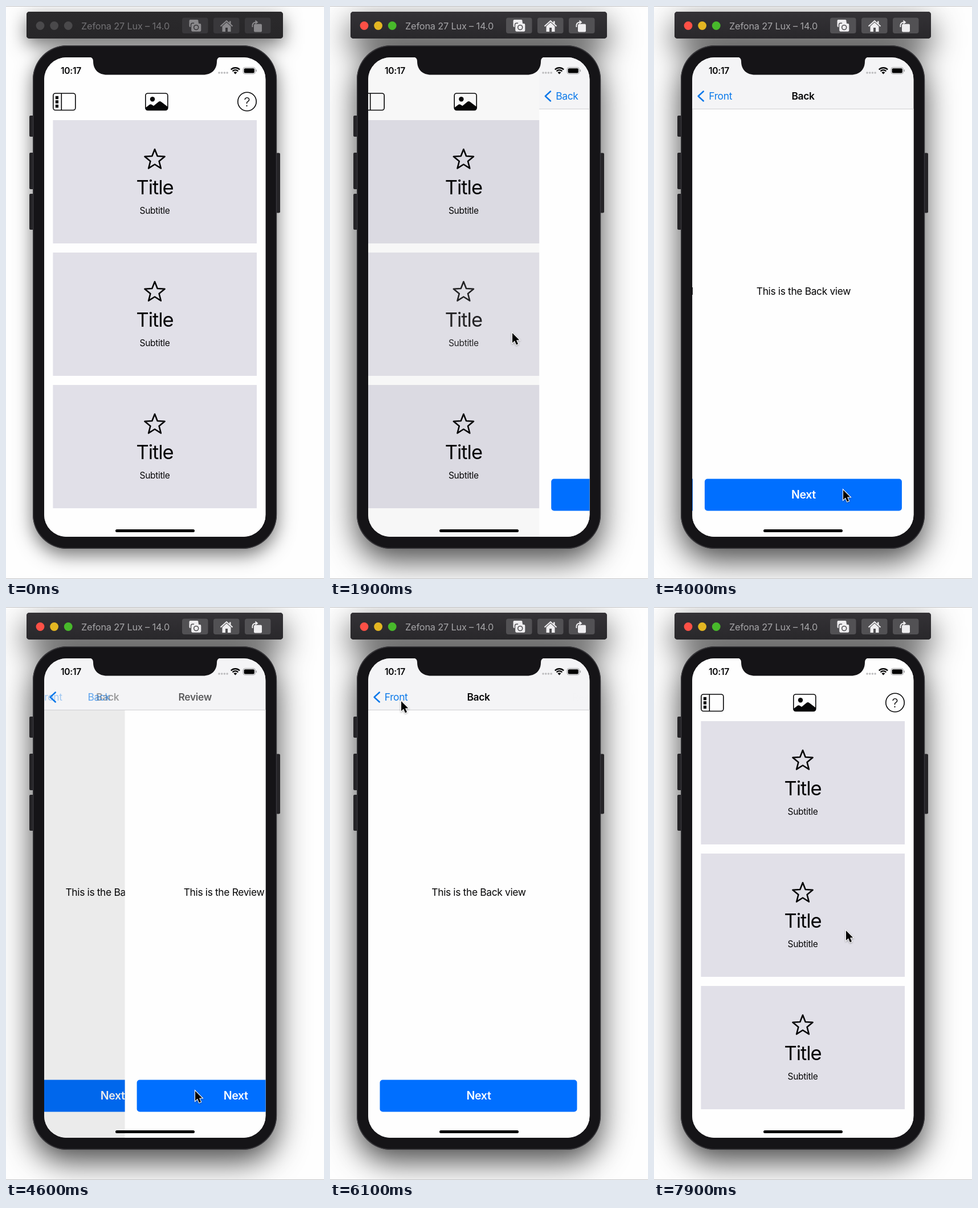
An HTML page with a canvas for the animation above (8 s loop, 558 px wide and 1004 px high).

```html
<!DOCTYPE html>
<html lang="en">
<head>
<meta charset="utf-8">
<title>Navigation demo</title>
<style>
html, body { margin: 0; width: 100%; height: 100%; overflow: hidden; background: #fefefe; }
canvas { display: block; width: 558px; height: 1004px; }
</style>
</head>
<body>
<canvas id="stage"></canvas>
<script>
const W = 558, H = 1004, LOOP = 8000, STEP = 100;
const SCREEN = { x: 67, y: 90, w: 388.6, h: 840 };
const MID = 261, PARALLAX = 117, BAR = 181;
const BLUE = '#0a78ea', INK = '#050506';
const SANS = 'Inter, "Liberation Sans", sans-serif';

const VIEWS = [
  { title: 'Home' },
  { title: 'Front', back: 'Back' },
  { title: 'Back', back: 'Front' },
  { title: 'Review', back: 'Back' }
];
// start time, view left, view entered
const MOVES = [[1850, 0, 1], [3540, 1, 2], [4480, 2, 3], [5680, 3, 2], [6340, 2, 1], [7000, 1, 0]];
// time, x, y of the pointer tip
const POINTER = [
  [1100, 462, 727], [1400, 320, 573], [2600, 320, 573], [3300, 332, 848], [4600, 332, 848],
  [5200, 109, 69], [5500, 125, 165], [7300, 125, 165], [7900, 337, 567]
];

const canvas = document.getElementById('stage');
const ctx = canvas.getContext('2d');
const dpr = window.devicePixelRatio || 1;
canvas.width = W * dpr;
canvas.height = H * dpr;

const clamp = v => Math.max(0, Math.min(1, v));
const smooth = v => v * v * (3 - 2 * v);
const spring = ms => {
  const k = Math.max(0, ms) * 0.018;
  return ms > 640 ? 1 : 1 - (1 + k) * Math.exp(-k);
};

function box(x, y, w, h, r, fill, stroke, lw = 1) {
  ctx.beginPath();
  ctx.roundRect(x, y, w, h, r);
  paint(fill, stroke, lw);
}
function disc(x, y, r, fill, stroke, lw) {
  ctx.beginPath();
  ctx.arc(x, y, r, 0, Math.PI * 2);
  paint(fill, stroke, lw);
}
function poly(pts, fill, stroke, lw, close = true) {
  ctx.beginPath();
  pts.forEach(([x, y]) => ctx.lineTo(x, y));
  if (close) ctx.closePath();
  paint(fill, stroke, lw);
}
function paint(fill, stroke, lw) {
  if (fill) { ctx.fillStyle = fill; ctx.fill(); }
  if (stroke) { ctx.strokeStyle = stroke; ctx.lineWidth = lw; ctx.stroke(); }
}
function text(str, x, y, size, { weight = 400, fill = INK, align = 'center', track = -0.02 } = {}) {
  ctx.font = `${weight} ${size}px ${SANS}`;
  ctx.letterSpacing = `${size * track}px`;
  ctx.textAlign = align;
  ctx.fillStyle = fill;
  ctx.fillText(str, x, y);
}
function layer(alpha, dx, draw) {
  ctx.save();
  ctx.globalAlpha *= clamp(alpha);
  ctx.translate(dx, 0);
  draw();
  ctx.restore();
}

function windowShadow(active) {
  ctx.save();
  ctx.shadowColor = `rgba(0,0,0,${active ? 0.72 : 0.55})`;
  ctx.shadowBlur = (active ? 54 : 32) * dpr;
  ctx.shadowOffsetY = (active ? 20 : 11) * dpr;
  ctx.beginPath();
  ctx.roundRect(36, 10, 450, 47, 5);
  ctx.roundRect(47, 69, 428, 882, 60);
  paint('#151417');
  ctx.restore();
}

function toolbar(active) {
  const g = ctx.createLinearGradient(0, 10, 0, 57);
  g.addColorStop(0, active ? '#343236' : '#2b2a2c');
  g.addColorStop(1, active ? '#29282b' : '#272628');
  box(36, 10, 450, 47, 5, g);
  const lights = active ? ['#fd5046', '#e3b622', '#48b92b'] : Array(3).fill('#4a494b');
  lights.forEach((c, i) => disc(60 + i * 24.6, 34.5, 7.4, c));
  text('Zefona 27 Lux – 14.0', 132, 40.5, 16.3,
    { fill: active ? '#a6a5a8' : '#727174', align: 'left', track: -0.01 });

  const face = active ? '#525154' : '#39383b', icon = active ? '#efeef0' : '#8a898c';
  [309, 364, 419].forEach(x => box(x, 20.5, 45.5, 27.5, 4, face));
  // camera
  box(321.5, 24, 16, 13, 2, icon);
  box(324.5, 30, 18.5, 15.5, 3, icon, face, 1.4);
  box(330, 28, 8, 4, 1.5, icon);
  disc(333.7, 37.5, 4, null, face, 1.6);
  // house
  poly([[376.5, 35.5], [387, 26], [397.5, 35.5]], null, icon, 2, false);
  poly([[379.5, 35.5], [387, 28.8], [394.5, 35.5], [394.5, 45], [379.5, 45]], icon);
  ctx.fillStyle = icon;
  ctx.fillRect(392, 26.5, 2.5, 5);
  ctx.fillStyle = face;
  ctx.fillRect(385, 38, 4, 7);
  // rotate
  box(435, 31.5, 14, 14, 2, icon);
  ctx.beginPath();
  ctx.moveTo(432.5, 37);
  ctx.quadraticCurveTo(431.5, 28.5, 438.5, 28.5);
  paint(null, icon, 2);
  poly([[437.5, 24.5], [442.5, 28.5], [437.5, 32]], icon);
}

function phoneBody() {
  [[41, 192, 37], [41, 257, 64], [41, 329, 63], [473, 257.5, 105]]
    .forEach(([x, y, h]) => box(x, y, 8, h, 2, '#252427'));
  box(47.7, 69.7, 426.8, 880.6, 60, '#151417', '#39383c', 1.4);
}

function notch() {
  ctx.beginPath();
  ctx.moveTo(146, 89);
  ctx.quadraticCurveTo(153, 90, 153, 97);
  ctx.bezierCurveTo(153, 112, 163, 120.5, 177, 120.5);
  ctx.lineTo(346, 120.5);
  ctx.bezierCurveTo(360, 120.5, 370, 112, 370, 97);
  ctx.quadraticCurveTo(370, 90, 377, 89);
  paint('#151417');
}

function statusBar() {
  text('10:17', 96, 119, 15.6, { weight: 600, align: 'left' });
  for (let i = 0; i < 4; i++) disc(374 + i * 4.7, 117, 1.8, '#bcbcbe');
  ctx.save();
  ctx.beginPath();
  ctx.moveTo(402.4, 119.5);
  ctx.lineTo(392, 108.6);
  ctx.lineTo(392, 104);
  ctx.lineTo(412.8, 104);
  ctx.lineTo(412.8, 108.6);
  ctx.clip();
  disc(402.4, 119, 3.8, INK);
  disc(402.4, 119, 6.8, null, INK, 2.3);
  disc(402.4, 119, 10.7, null, INK, 2.4);
  ctx.restore();
  box(416, 107.6, 21.5, 11.4, 3.4, null, '#a0a0a3', 1);
  box(417.6, 109.2, 18.3, 8.2, 2, '#000');
  box(438.5, 111.3, 1.5, 4, 1, '#a0a0a3');
}

function star(cx, cy) {
  const pts = [];
  for (let i = 0; i < 10; i++) {
    const a = i * Math.PI / 5 - Math.PI / 2, r = i % 2 ? 8 : 18.5;
    pts.push([cx + r * Math.cos(a), cy + r * Math.sin(a)]);
  }
  ctx.lineJoin = 'round';
  poly(pts, null, INK, 2.6);
}

function card(y) {
  ctx.fillStyle = '#e1e0e8';
  ctx.fillRect(82.4, y, 357.6, 216);
  star(MID, y + 69.5);
  text('Title', MID, y + 130, 34.5, { track: -0.03 });
  text('Subtitle', MID, y + 163.5, 15.5);
}

function home(press) {
  ctx.fillStyle = '#fefefe';
  ctx.fillRect(SCREEN.x, SCREEN.y, SCREEN.w, SCREEN.h);
  box(82.8, 153, 39, 29.5, 4, null, INK, 1.6);
  poly([[97.3, 153], [97.3, 182.5]], null, INK, 1.6);
  ctx.fillStyle = INK;
  [157.8, 165.2, 172.8].forEach(y => ctx.fillRect(86.8, y, 5.2, 5.4));

  ctx.save();
  box(244.8, 153, 39, 29.5, 4, null, INK, 1.6);
  ctx.clip();
  disc(257, 163.3, 4.2, INK);
  ctx.beginPath();
  ctx.moveTo(244, 179);
  ctx.lineTo(252, 172.8);
  ctx.quadraticCurveTo(254, 171.6, 256, 173);
  ctx.lineTo(259, 175);
  ctx.lineTo(267.5, 168);
  ctx.quadraticCurveTo(270, 166, 272.5, 168);
  ctx.lineTo(285, 177.5);
  ctx.lineTo(285, 184);
  ctx.lineTo(244, 184);
  paint(INK);
  ctx.restore();

  disc(423, 167.5, 16.2, null, INK, 1.6);
  text('?', 423, 175.5, 22, { weight: 300, track: 0 });
  card(200);
  layer(press, 0, () => card(432));
  card(664);
}

function page(view, press) {
  ctx.fillStyle = '#fefefe';
  ctx.fillRect(SCREEN.x, BAR - 1, SCREEN.w, SCREEN.y + SCREEN.h - BAR + 1);
  text(`This is the ${view.title} view`, MID + 0.5, 505.5, 17.4);
  layer(press, 0, () => {
    box(88, 828.5, 346, 56, 5, '#006fff');
    text('Next', MID + 0.5, 863, 19.6, { weight: 600, fill: '#fff' });
  });
}

function barBack() {
  ctx.fillStyle = '#f4f4f6';
  ctx.fillRect(SCREEN.x, SCREEN.y, SCREEN.w, BAR - SCREEN.y - 0.5);
  ctx.fillStyle = '#cfcfd2';
  ctx.fillRect(SCREEN.x, BAR - 1, SCREEN.w, 1);
}
function chevron(alpha) {
  ctx.lineCap = 'round';
  ctx.lineJoin = 'round';
  layer(alpha, 0, () => poly([[86.8, 149.5], [77.6, 158], [86.8, 166.5]], null, BLUE, 2.5, false));
  ctx.lineCap = 'butt';
}
// d: 0 when shown, 1 to come, -1 gone by
function barLabels(view, d, press) {
  const fade = 1 - Math.abs(d);
  layer(fade, d * (d > 0 ? 194 : 130), () => text(view.title, MID, 164, 17.4, { weight: 600 }));
  layer(fade * press, d * (d > 0 ? 130 : 60), () =>
    text(view.back, 96, 164, 17.4, { fill: BLUE, align: 'left' }));
}

function state(t) {
  let pos = 0;
  const press = { view: -1, body: 1, bar: 1 };
  for (const [start, from, to] of MOVES) {
    const dt = t - start;
    if (dt >= 0) pos = from + (to - from) * spring(dt);
    if (dt >= -150 && dt < 640) {
      press.view = from;
      press.body = to > from ? 0.3 + 0.7 * clamp((dt + 90) / 175) : 1;
      press.bar = to < from ? 0.3 + 0.7 * clamp((dt - 20) / 280) : 1;
    }
  }
  return { pos, press };
}

function screen(t) {
  const { pos, press } = state(t);
  const low = Math.floor(pos), f = pos - low, high = low + 1;
  const body = i => press.view === i ? press.body : 1;
  const bar = i => press.view === i ? press.bar : 1;
  const show = i => i ? page(VIEWS[i], body(i)) : home(body(0));

  ctx.save();
  ctx.beginPath();
  ctx.roundRect(SCREEN.x, SCREEN.y, SCREEN.w, SCREEN.h, 39);
  ctx.clip();
  ctx.fillStyle = '#fefefe';
  ctx.fillRect(SCREEN.x, SCREEN.y, SCREEN.w, SCREEN.h);
  layer(1, -f * PARALLAX, () => show(low));
  if (f > 0) {
    ctx.fillStyle = `rgba(0,0,0,${0.12 * f})`;
    ctx.fillRect(SCREEN.x, SCREEN.y, SCREEN.w, SCREEN.h);
    layer(1, (1 - f) * SCREEN.w, () => {
      show(high);
      if (!low) {
        barBack();
        chevron(bar(1));
        barLabels(VIEWS[1], 0, bar(1));
      }
    });
  }
  if (low) {
    barBack();
    chevron(press.bar);
    barLabels(VIEWS[low], -f, bar(low));
    if (f > 0) barLabels(VIEWS[high], 1 - f, bar(high));
  }
  statusBar();
  box(192, 917, 139, 5, 2.5, '#000');
  ctx.restore();
  notch();
}

function pointer(t) {
  if (t < POINTER[0][0]) return;
  let i = POINTER.findIndex(p => p[0] > t);
  if (i < 0) i = POINTER.length;
  const a = POINTER[i - 1], b = POINTER[i] || a;
  const k = b === a ? 0 : smooth((t - a[0]) / (b[0] - a[0]));
  ctx.save();
  ctx.translate(a[1] + (b[1] - a[1]) * k, a[2] + (b[2] - a[2]) * k);
  const arrow = [[0, 0], [0, 17.2], [4, 13.6], [7, 20.4], [10, 19.1], [7, 12.4], [12.2, 12.2]];
  ctx.lineJoin = 'miter';
  ctx.shadowColor = 'rgba(0,0,0,.35)';
  ctx.shadowBlur = 3 * dpr;
  ctx.shadowOffsetY = dpr;
  poly(arrow, null, '#fff', 2.2);
  ctx.shadowColor = 'transparent';
  poly(arrow, '#000');
  ctx.restore();
}

function render(t) {
  const active = t >= 1700;
  ctx.setTransform(dpr, 0, 0, dpr, 0, 0);
  ctx.fillStyle = '#fefefe';
  ctx.fillRect(0, 0, W, H);
  windowShadow(active);
  toolbar(active);
  phoneBody();
  screen(t);
  ctx.fillStyle = '#c4c4c6';
  ctx.fillRect(0, 0, W, 1);
  ctx.fillRect(0, H - 1, W, 1);
  pointer(t);
}

const begin = performance.now();
function tick() {
  const t = (performance.now() - begin) % LOOP;
  render(Math.floor(t / STEP) * STEP);
  requestAnimationFrame(tick);
}
tick();
</script>
</body>
</html>
```
